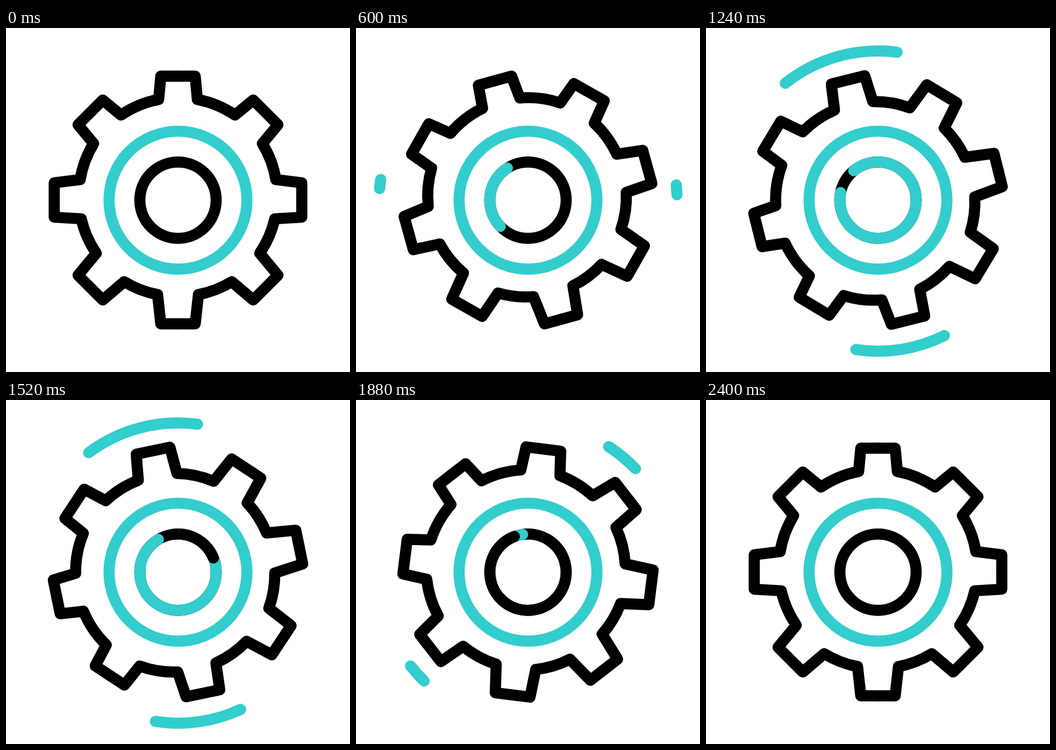
An HTML page with a canvas for the animation above (2480 ms loop, 640 by 640 pixels).

```html
<!DOCTYPE html>
<html>
<head>
<meta charset="utf-8">
<style>
  html, body { margin: 0; width: 100%; height: 100%; overflow: hidden; background: #fff; }
  canvas { display: block; width: 100vmin; height: 100vmin; }
</style>
</head>
<body>
<canvas width="640" height="640"></canvas>
<script>
const ctx = document.querySelector('canvas').getContext('2d');
const BLACK = '#000', TEAL = '#33cdcd';
const STEP = 40, LOOP = 2480, LAST = 60;

// Right half of the gear outline, mirrored when drawn.
const rim = 'A185.5 185.5 0 0 1 ';
const halfGear = new Path2D(
  'M0-230.3L32-230.3L36-187' + rim + '106-158L140-186L186-140L157-105' +
  rim + '182-38L230.3-32L230.3 32L180 35' + rim + '152 99L186 140L140 186L100 152' +
  rim + '38 176L32 230.3L0 230.3');

// Progress 0..1 from step a to step b along the bezier (x1, 0, x2, 1).
function ease(f, a, b, x1, x2) {
  const x = (f - a) / (b - a);
  if (x <= 0) return 0;
  if (x >= 1) return 1;
  let lo = 0, hi = 1;
  for (let i = 0; i < 24; i++) {
    const s = (lo + hi) / 2, r = 1 - s;
    if (3 * x1 * s * r * r + 3 * x2 * s * s * r + s * s * s < x) lo = s; else hi = s;
  }
  return lo * lo * (3 - 2 * lo);
}

// Everything swings counter-clockwise until TURN, then back.
const TURN = 34, BORN = 13, GONE = 51;
const gearSwing = f => ease(f, 0, TURN, .84, .587) - ease(f, TURN, LAST, .49, .337);
const arcSwing = f => ease(f, BORN, TURN, .29, .2) - ease(f, TURN, GONE, .95, .7);

// The inner ring is filled with teal, then wiped by black, while it rotates.
const FILL = 8, WIPE = 32, SWEEP = 20, SPAN = 321;
const sweep = (f, begin) => SPAN * ease(f, begin, begin + SWEEP, .578, .167);
const ringTurn = f => -140 + 172 * ease(f, FILL, 50, .54, .48);

// Angles are in degrees, clockwise from the top.
const rad = deg => deg * Math.PI / 180;
function arc(color, radius, from = 0, to = 360, cy = .3) {
  ctx.strokeStyle = color;
  ctx.beginPath();
  ctx.arc(0, cy, radius, rad(from - 90), rad(to - 90));
  ctx.stroke();
}

function drawGear(f) {
  ctx.save();
  ctx.rotate(rad(-106 * gearSwing(f)));
  ctx.strokeStyle = BLACK;
  ctx.stroke(halfGear);
  ctx.scale(-1, 1);
  ctx.stroke(halfGear);
  ctx.restore();
}

function drawInnerRing(f) {
  arc(BLACK, 71);
  if (f <= FILL || f >= WIPE + SWEEP) return;
  const from = ringTurn(f);
  arc(TEAL, 71, from, from + sweep(f, FILL));
  if (f > WIPE) arc(BLACK, 71, from, from + sweep(f, WIPE));
}

// The tail follows the lead half a step later and not as far.
function drawOuterArc(f, start, leadRange, tailRange, cy) {
  if (f <= BORN || f >= GONE) return;
  const lead = start - leadRange * arcSwing(f);
  const tail = start - tailRange * arcSwing(f - .5);
  arc(TEAL, 277.3, lead, Math.max(tail, lead + .1), cy);
}

function draw(f) {
  ctx.setTransform(1, 0, 0, 1, 0, 0);
  ctx.fillStyle = '#fff';
  ctx.fillRect(0, 0, 640, 640);
  ctx.translate(320, 320);
  ctx.lineWidth = 20.7;
  ctx.lineCap = ctx.lineJoin = 'round';

  drawGear(f);
  arc(TEAL, 128.3);
  drawInnerRing(f);
  drawOuterArc(f, 90, 130, 84, 0);
  drawOuterArc(f, 281, 129, 94, 4);
}

const start = performance.now();
function tick() {
  const time = (performance.now() - start) % LOOP;
  draw(Math.min(LAST, Math.floor(time / STEP)));
  requestAnimationFrame(tick);
}
tick();
</script>
</body>
</html>
```
